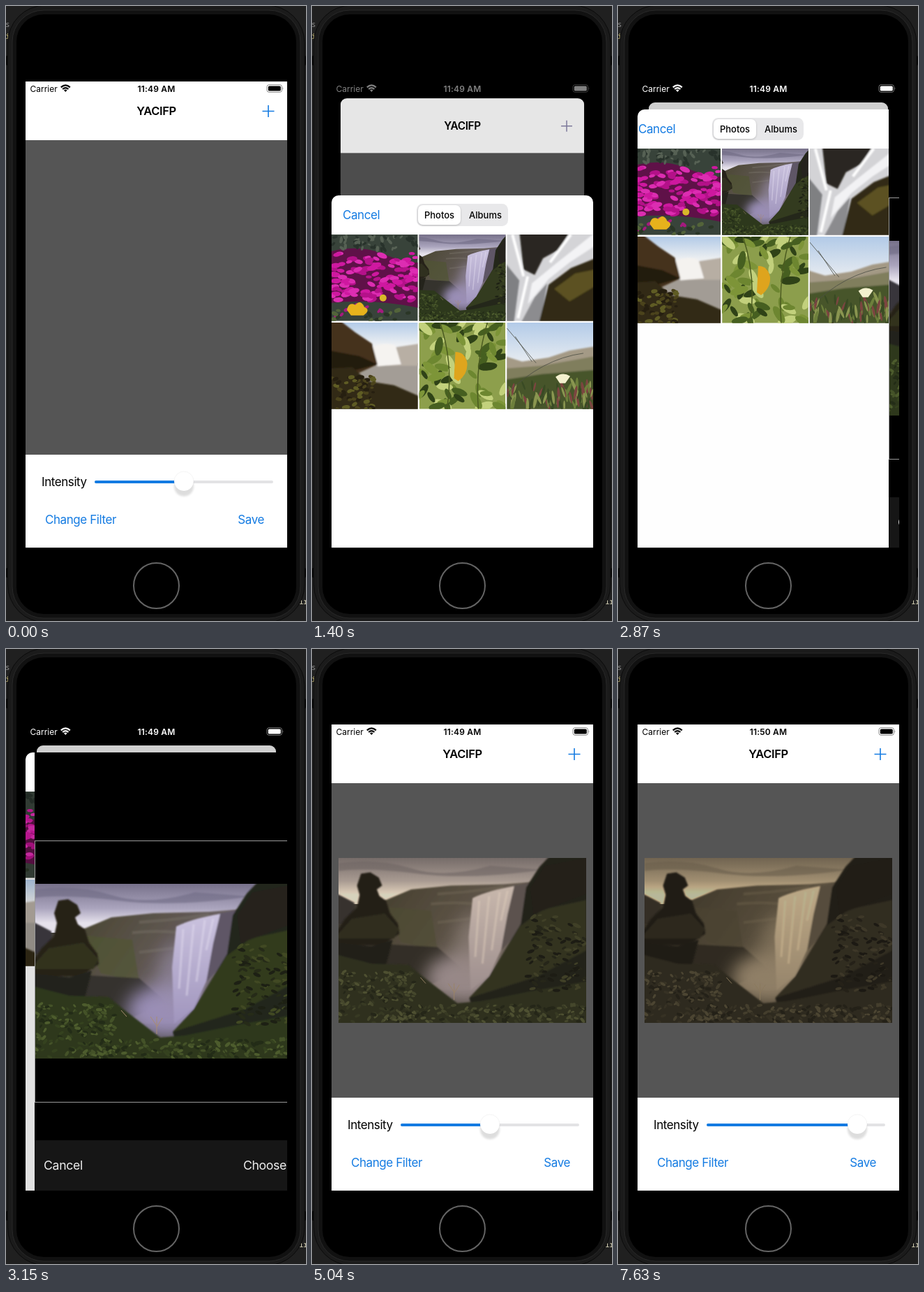
Animation of 430 by 880 pixels, one loop 8000 ms. Source, as an HTML page:

```html
<!DOCTYPE html>
<html lang="en">
<head>
<meta charset="utf-8">
<title>Photo filter app</title>
<style>
  html, body { margin: 0; width: 100%; height: 100%; overflow: hidden; background: #1c1c1c; }
  svg { display: block; }
  text { font: 17px Inter, Roboto, sans-serif; letter-spacing: -.025em; }
  .mid { text-anchor: middle; }
  .end { text-anchor: end; }
  .link { fill: #147be2; }
  .title { font-weight: 600; font-size: 16.5px; }
  .tab { font-size: 13px; font-weight: 500; letter-spacing: 0; }
  .tool { font-size: 17.7px; letter-spacing: -.02em; fill: #eee; }
  #status text { font-size: 12px; letter-spacing: 0; fill: currentColor; }
  #status #clock { font-weight: 600; letter-spacing: .2px; }
  .code { font: 11px "Noto Sans Mono", monospace; }
</style>
</head>
<body>
<svg id="stage" width="430" height="880" viewBox="0 0 430 880">
  <defs>
    <clipPath id="screenClip"><rect width="375" height="667"/></clipPath>
    <clipPath id="cardClip"><rect id="cardShape" width="375" height="700"/></clipPath>
    <clipPath id="sheetClip"><rect width="375" height="800" rx="10"/></clipPath>
    <filter id="soft" x="-50%" y="-50%" width="200%" height="200%"><feGaussianBlur stdDeviation="1.8"/></filter>
    <filter id="mist" x="-50%" y="-50%" width="200%" height="200%"><feGaussianBlur stdDeviation="13"/></filter>
    <filter id="edge"><feGaussianBlur stdDeviation="1.3"/></filter>
    <linearGradient id="sky" x2="0" y2="1">
      <stop stop-color="#77718a"/><stop offset=".5" stop-color="#aaa4bd"/><stop offset=".8" stop-color="#e6e2ec"/>
    </linearGradient>
    <linearGradient id="fall" x2="0" y2="1">
      <stop stop-color="#cbc3df"/><stop offset="1" stop-color="#a095bd"/>
    </linearGradient>
    <linearGradient id="cliff" y2=".5">
      <stop stop-color="#48452f"/><stop offset=".5" stop-color="#5e5650"/><stop offset="1" stop-color="#776c78"/>
    </linearGradient>
    <linearGradient id="day" x2="0" y2="1">
      <stop stop-color="#b3cbe8"/><stop offset=".5" stop-color="#eceff2"/>
    </linearGradient>

    <symbol id="waterfall" viewBox="0 0 375 250" preserveAspectRatio="xMidYMid slice">
      <rect width="375" height="250" fill="#403d38"/>
      <rect width="375" height="70" fill="url(#sky)"/>
      <g filter="url(#edge)">
        <path d="M0 8Q60 0 110 16T230 12L310 18Q200 34 120 24T0 20Z" fill="#6f6984" opacity=".6"/>
        <path d="M-5 53L24 68V100H-5Z" fill="#38353a"/>
        <path d="M62 68L110 48L170 42L250 40L300 36V200H60Z" fill="url(#cliff)"/>
        <path d="M70 74L140 80L150 140L95 128Z" fill="#515534" opacity=".7"/>
        <path d="M150 55Q200 52 250 44M140 70Q180 66 205 70M150 98L200 92" fill="none" stroke="#777066" stroke-width="4" opacity=".5"/>
        <path d="M60 130L150 135L190 170L120 200H60Z" fill="#35332d"/>
      </g>
      <ellipse cx="190" cy="182" rx="58" ry="38" fill="#9a8eb6" filter="url(#mist)"/>
      <ellipse cx="205" cy="135" rx="30" ry="50" fill="#9a8fab" filter="url(#mist)" opacity=".6"/>
      <g filter="url(#edge)">
        <path d="M262 43L300 36L295 90L246 140Z" fill="#5f5666"/>
        <path d="M203 61Q225 50 266 43L256 85L246 140L228 178L200 200L197 120Z" fill="url(#fall)"/>
        <path d="M213 65L207 150M228 58L218 160M244 52L232 140M256 50L246 95" stroke="#e6e0f2" stroke-width="3" opacity=".45"/>
        <path d="M276 100L284 45L304 14L322-5H380V255H210L198 212L228 180L246 150Z" fill="#24271a"/>
        <path d="M274 104L310 78L375 64V140L300 180L198 212L228 180L246 150Z" fill="#333b1f"/>
        <path d="M290 46L312 12L375 0V55L295 85Z" fill="#25231e"/>
        <path d="M-5 115L10 92L28 75L32 56L28 42L34 24L48 22L61 30L66 42L58 48L62 58L72 65L78 84L90 100L92 115L75 126L60 132H-5Z" fill="#262219"/>
        <path d="M-5 120L20 92L70 84L92 108L84 122H-5Z" fill="#30301f"/>
        <path d="M-5 128L50 134L82 124L70 170L-5 165Z" fill="#24231b"/>
        <path d="M-5 146L50 160L106 162L128 180L180 220L215 217L290 202L380 186V255H-5Z" fill="#2d381c"/>
      </g>
      <g id="meadow"></g>
      <path d="M175 215V190M175 203L166 190M175 205L183 192M132 190L124 181" stroke="#a98c72" fill="none"/>
    </symbol>

    <symbol id="blossoms" viewBox="0 0 124 124">
      <rect width="124" height="124" fill="#38433a"/>
      <path d="M0 24Q40 14 75 28T124 40V105Q60 92 0 98Z" fill="#5f1148"/>
      <g id="petals"></g>
      <path d="M22 108Q25 96 34 101Q42 92 47 104Q57 108 46 116H28Z" fill="#e7b31c"/>
      <circle cx="74" cy="91" r="5" fill="#d9b92a"/>
    </symbol>

    <symbol id="rapids" viewBox="0 0 124 124">
      <rect width="124" height="124" fill="#d4d4d7"/>
      <g filter="url(#edge)">
        <path d="M18-3H90L74 22L52 34L40 58L24 50Z" fill="#2a2720"/>
        <path d="M-3 40L18 66L10 127H-3Z" fill="#7f8083"/>
        <path d="M127 16L90 40L60 64L30 100L36 70L70 42L127-3Z" fill="#f3f3f5"/>
        <path d="M20 127L40 90L58 70L48 127Z" fill="#8c8c8f"/>
        <path d="M60 72L92 48L127 34V127H46Z" fill="#322b16"/>
        <path d="M68 78L98 56L127 50V74L90 96Z" fill="#5b5120"/>
        <path d="M92 0L62 40M8 0L24 60M30 60L16 120" stroke="#fff" stroke-width="4"/>
      </g>
    </symbol>

    <symbol id="cove" viewBox="0 0 124 124">
      <rect width="124" height="62" fill="url(#day)"/>
      <rect y="58" width="124" height="66" fill="#a39d96"/>
      <g filter="url(#edge)">
        <path d="M88 36L127 30V62H80Z" fill="#b8afa4"/>
        <path d="M58 35Q76 28 92 33L100 60L66 63Z" fill="#f5f3f0"/>
        <path d="M-3-3H12L34 14L58 30L66 60L40 72L-3 80Z" fill="#44301a"/>
        <path d="M-3 40L40 48L66 60L-3 78Z" fill="#241c10"/>
        <path d="M-3 66L30 64L52 84L90 90L127 106V127H-3Z" fill="#332a14"/>
      </g>
      <g id="moss"></g>
    </symbol>

    <symbol id="leaves" viewBox="0 0 124 124">
      <rect width="124" height="124" fill="#8d9f4c"/>
      <g id="foliage"></g>
      <path d="M52 42Q66 42 69 58Q70 74 56 84L50 80Z" fill="#dfa51d"/>
      <path d="M30 0Q50 60 40 124M98 0Q80 60 85 124" fill="none" stroke="#4b5b20" stroke-width="1.5"/>
    </symbol>

    <symbol id="dunes" viewBox="0 0 124 124">
      <rect width="124" height="124" fill="url(#day)"/>
      <g filter="url(#edge)">
        <path d="M-3 48L22 56L60 50L90 40L127 34V90H-3Z" fill="#a49a86"/>
        <path d="M-3 66L50 62L127 48V100H-3Z" fill="#807e5d"/>
        <path d="M-3 82L50 74L127 68V127H-3Z" fill="#47552b"/>
      </g>
      <g id="spikes"></g>
      <path d="M0 8L42 58M12 20L36 56M0 102Q50 52 110 44" fill="none" stroke="#4b4d45" stroke-width=".8"/>
      <path d="M70 78Q80 70 91 77L84 87H76Z" fill="#f4f1cf"/>
    </symbol>
  </defs>

  <!-- simulator window -->
  <rect width="430" height="880" fill="#202020"/>
  <g fill="#8d8d8d">
    <text class="code" x="-1" y="30">s</text>
    <text class="code" x="-1" y="47" fill="#b5a96b">i</text>
    <text class="code" x="420" y="856" fill="#d5d0b4">ir</text>
  </g>
  <g fill="#080808">
    <rect y="71" width="12" height="14" rx="2"/><rect y="804" width="12" height="14" rx="2"/>
    <rect x="418" y="71" width="12" height="14" rx="2"/><rect x="418" y="804" width="12" height="14" rx="2"/>
  </g>
  <rect x="2.5" y="-1" width="425.5" height="883" rx="54" fill="#1b1b1b" stroke="#0b0b0b"/>
  <rect x="9" y="6" width="413" height="870" rx="45" fill="#111" stroke="#292929"/>
  <rect x="15" y="12" width="401" height="858" rx="39"/>
  <circle cx="215.5" cy="829.5" r="32.5" fill="none" stroke="#646464" stroke-width="2"/>

  <g transform="translate(28 108)"><g clip-path="url(#screenClip)">
    <g id="card"><g clip-path="url(#cardClip)">
      <rect width="375" height="700" fill="#fff"/>
      <text class="title mid" x="187.5" y="48">YACIFP</text>
      <path id="plus" d="M339.5 42.5H356.5M348 34V51" stroke-width="1.6"/>
      <rect y="84" width="375" height="450" fill="#555"/>
      <g id="picture"><use href="#waterfall" x="10" y="191" width="355" height="236"/></g>
      <text x="23" y="579">Intensity</text>
      <rect x="99" y="571" width="256" height="4" rx="2" fill="#e3e3e5"/>
      <rect id="filled" x="99" y="571" height="4" rx="2" fill="#147be2"/>
      <g id="thumb">
        <circle cy="579.5" r="14" opacity=".13" filter="url(#soft)"/>
        <circle cy="572" r="14" fill="#fff" stroke="#000" stroke-opacity=".07" stroke-width=".7"/>
      </g>
      <text class="link" x="28" y="633">Change Filter</text>
      <text class="link end" x="342" y="633">Save</text>
      <rect id="cardDim" width="375" height="700"/>
    </g></g>

    <g id="sheet"><g clip-path="url(#sheetClip)">
      <rect id="paper" height="800" fill="#fff"/>
      <g id="list"></g>
      <rect id="listDim" y="56" width="375" height="744"/>
      <g id="bar">
        <text class="link" x="16" y="34">Cancel</text>
        <rect x="122" y="12" width="131" height="32" rx="8.5" fill="#e8e8ea"/>
        <rect x="124" y="15" width="61" height="28" rx="7" opacity=".2" filter="url(#soft)"/>
        <rect x="124" y="14" width="61" height="28" rx="7" fill="#fff"/>
        <text class="tab mid" x="154.5" y="32.7">Photos</text>
        <text class="tab mid" x="220.5" y="32.7">Albums</text>
      </g>
      <g id="editor">
        <rect width="375" height="800"/>
        <use href="#waterfall" y="188" width="375" height="250"/>
        <rect x=".5" y="126.5" width="374" height="374" fill="none" stroke="#9a9a9a"/>
        <rect y="555" width="375" height="245" fill="#161616"/>
        <text class="tool" x="13" y="597">Cancel</text>
        <text class="tool end" x="361" y="597">Choose</text>
      </g>
    </g></g>

    <g id="status">
      <text x="6.5" y="14.5">Carrier</text>
      <g fill="none" stroke="currentColor" stroke-width="2.2">
        <path d="M50.8 8.4Q57.3 2.2 63.8 8.4M53.2 11Q57.3 7.2 61.4 11"/>
        <path d="M55 12.4Q57.3 10.6 59.6 12.4L57.3 15Z" fill="currentColor" stroke="none"/>
      </g>
      <text id="clock" class="mid" x="187.5" y="14.5"></text>
      <rect x="346" y="4.7" width="21.5" height="10.6" rx="3" fill="none" stroke="currentColor" opacity=".45"/>
      <rect x="347.8" y="6.4" width="18" height="7.2" rx="1.7" fill="currentColor"/>
      <path d="M368.7 8.3Q370.4 10 368.7 11.7Z" fill="currentColor" opacity=".5"/>
    </g>
  </g></g>
</svg>
<script>
const $ = id => document.getElementById(id);
const LOOP = 8000, TICK = 70;

let seed = 7;
const random = (min, max) => {
  seed = seed * 16807 % 2147483647;
  return min + (max - min) * seed / 2147483647;
};

// Fills a group with small tilted ellipses inside a box.
function scatter(id, count, [x0, y0, x1, y1], rx, ry, tilt, colors) {
  let marks = '';
  for (let i = 0; i < count; i++) {
    const x = random(x0, x1), y = random(y0, y1), size = random(.6, 1.2);
    marks += `<ellipse rx="${rx * size}" ry="${ry * size}" fill="${colors[i % colors.length]}"
      transform="translate(${x} ${y}) rotate(${random(-tilt, tilt)})"/>`;
  }
  $(id).innerHTML += marks;
}
const greens = ['#445228', '#232c17', '#4d5c2d', '#35421f'];
scatter('meadow', 180, [0, 172, 115, 250], 4, 2, 60, greens);
scatter('meadow', 170, [100, 222, 375, 250], 4, 2, 60, greens);
scatter('meadow', 110, [285, 85, 375, 205], 5, 2.2, 40, ['#262b18', '#414923', '#1d2014']);
scatter('petals', 50, [0, 2, 124, 22], 4, 2, 90, ['#566154', '#28322b']);
scatter('petals', 110, [0, 27, 124, 94], 7, 3.5, 25, ['#cf18a0', '#b5118a', '#dd2db2']);
scatter('petals', 24, [0, 100, 124, 124], 5, 3, 60, ['#53643a', '#a51a7e', '#2a3626']);
scatter('moss', 60, [0, 78, 62, 124], 4, 2.5, 40, ['#5f5c24', '#261f10', '#4b431c']);
scatter('foliage', 75, [0, 0, 124, 124], 12, 5, 80, ['#6d8730', '#465f20', '#c3d17c', '#7d9538', '#2f4217']);
scatter('spikes', 75, [0, 90, 124, 122], 2, 10, 25, ['#6d7f3c', '#394a24', '#7c4540', '#8a9650']);

$('list').innerHTML = ['blossoms', 'waterfall', 'rapids', 'cove', 'leaves', 'dunes'].map((name, i) =>
  `<use href="#${name}" x="${i % 3 * 125.65}" y="${56 + (i > 2) * 126}" width="123.7" height="123.7"/>`).join('');

const ramp = (t, from, to) => Math.min(1, Math.max(0, (t - from) / (to - from)));
const smooth = x => x * x * (3 - 2 * x);
// Critically damped spring from 0 to 1.
const spring = (t, start, rate) => {
  const x = Math.max(0, t - start) / 1000 * rate;
  return x > 6.6 ? 1 : 1 - (1 + x) * Math.exp(-x);
};
const move = (id, x, y, scale = 1) =>
  $(id).setAttribute('transform', `translate(${x} ${y}) scale(${scale})`);

function draw(t) {
  const shown = spring(t, 1173, 13.3) - spring(t, 4410.3, 13.3);
  const pushed = spring(t, 2852, 17.4);
  const intensity = .5 + .386 * smooth(ramp(t, 6100, 7630));

  const scale = 1 - .085 * shown;
  move('card', 187.5 * (1 - scale), 30 * shown, scale);
  $('cardShape').setAttribute('rx', Math.min(10, shown * 40));
  $('cardDim').setAttribute('opacity', .19 * shown ** 3);
  $('plus').style.stroke = `color-mix(in srgb, #147be2, #8a86ac ${Math.min(1, shown * 1.3) * 100}%)`;
  $('plus').style.opacity = t >= 1050 && t < 1190 ? .35 : 1;

  const editorX = Math.round(375 * (1 - pushed));
  move('sheet', 0, Math.round(667 - 627 * shown));
  move('list', -112.5 * pushed, 0);
  move('bar', editorX - 375, 0);
  move('editor', editorX, 0);
  $('paper').setAttribute('width', editorX);
  $('listDim').setAttribute('width', editorX);
  $('listDim').setAttribute('opacity', .12 * pushed);

  $('picture').style.display = t > 4400 ? '' : 'none';
  $('picture').style.filter =
    `sepia(${intensity}) brightness(${1 - .32 * intensity}) saturate(${1 + .1 * intensity})`;
  const x = 113 + 228 * intensity;
  move('thumb', x, 0);
  $('filled').setAttribute('width', x - 99);

  const light = 255 * (ramp(t, 1260, 1540) - ramp(t, 4560, 4900));
  $('status').style.color = `rgb(${light} ${light} ${light})`;
  $('clock').textContent = t < 7140 ? '11:49 AM' : '11:50 AM';
}

function frame() {
  const t = performance.now() % LOOP;
  draw(Math.floor(t / TICK) * TICK);
  requestAnimationFrame(frame);
}
frame();
</script>
</body>
</html>
```
